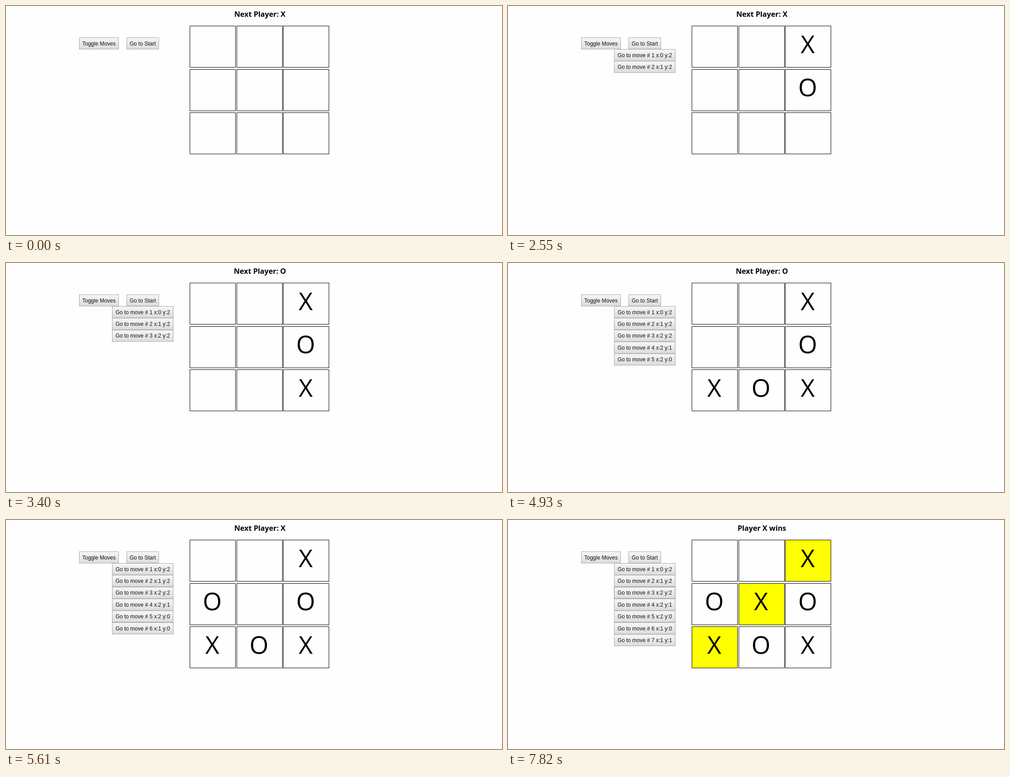
An HTML page that plays this animation: 1099x510 px, repeating every 7990 ms.

```html
<!DOCTYPE html>
<html lang="en">
<head>
<meta charset="utf-8">
<title>Tic-tac-toe</title>
<style>
  html, body { margin: 0; width: 100%; height: 100%; overflow: hidden; background: #fefefe; }
  svg { display: block; width: 1099px; height: 510px; }
  text { text-anchor: middle; fill: #000; }
  .status { font: 700 16.2px "Open Sans", "Noto Sans", sans-serif; }
  .mark { font: 400 54px "Open Sans", "Noto Sans", sans-serif; }
  .button text { font: 12px "Liberation Sans", Arial, sans-serif; fill: #111; }
  .button rect { fill: url(#face); stroke: #a6a6a6; }
  .button.hover rect { stroke: #858585; }
  .cell { stroke: #000; }
</style>
</head>
<body>
<svg id="stage" viewBox="0 0 1099 510">
  <defs>
    <linearGradient id="face" x1="0" y1="0" x2="0" y2="1">
      <stop offset="0" stop-color="#f7f7f7"/>
      <stop offset="1" stop-color="#dcdcdc"/>
    </linearGradient>
  </defs>
</svg>
<script>
const LOOP = 7990;
const HOVER_AT = 7820;
const MOVES = [
  { at: 1360, row: 0, col: 2 },
  { at: 2550, row: 1, col: 2 },
  { at: 3400, row: 2, col: 2 },
  { at: 4250, row: 2, col: 1 },
  { at: 4930, row: 2, col: 0 },
  { at: 5610, row: 1, col: 0 },
  { at: 6630, row: 1, col: 1 },
];
const COLS = [407.5, 511.5, 614.5];
const ROWS = [44.5, 141.5, 237.5];
const stage = document.getElementById("stage");

function add(parent, tag, attrs, content = "") {
  const node = document.createElementNS("http://www.w3.org/2000/svg", tag);
  for (const key in attrs) node.setAttribute(key, attrs[key]);
  node.textContent = content;
  return parent.appendChild(node);
}

function addButton(x, y, width, label) {
  const group = add(stage, "g", { class: "button" });
  add(group, "rect", { x, y, width, height: 25.5 });
  add(group, "text", { x: x + width / 2, y: Math.round(y + 17) }, label);
  return group;
}

const show = (node, visible) => node.setAttribute("visibility", visible ? "visible" : "hidden");

const status = add(stage, "text", { class: "status", x: 562.5, y: 24 });

const cells = ROWS.map(y => COLS.map(x =>
  add(stage, "rect", { class: "cell", x, y, width: 101, height: 92 })));

addButton(162.5, 70.5, 87, "Toggle Moves");
addButton(267.5, 70.5, 71, "Go to Start");

const turns = MOVES.map(({ at, row, col }, i) => ({
  at,
  mark: add(stage, "text", { class: "mark", x: 457 + 103.5 * col, y: 105 + 96.3 * row }, "XO"[i % 2]),
  button: addButton(235.5, 96.5 + 26.4 * i, 135, `Go to move # ${i + 1} x:${row} y:${col}`),
}));

function render(time) {
  const played = MOVES.filter(move => time >= move.at).length;
  const won = played === MOVES.length;
  status.textContent = won ? "Player X wins" : `Next Player: ${"XO"[played % 2]}`;
  turns.forEach(({ mark, button }, i) => {
    show(mark, i < played);
    show(button, i < played);
  });
  cells.forEach((line, row) => line.forEach((cell, col) =>
    cell.setAttribute("fill", won && row + col === 2 ? "#ffff00" : "#fefefe")));
  turns[2].button.classList.toggle("hover", time >= HOVER_AT);
}

const start = performance.now();
function tick() {
  render((performance.now() - start) % LOOP);
  requestAnimationFrame(tick);
}
tick();
</script>
</body>
</html>
```
